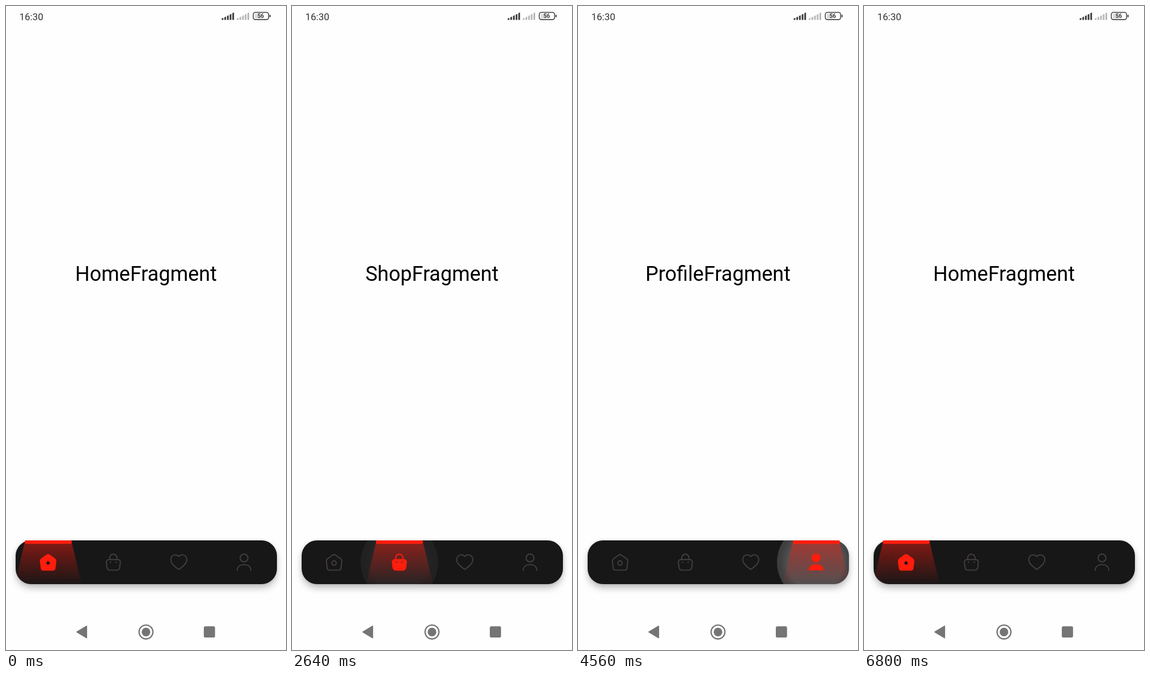
Write an HTML page that moves like this. It is 494x1134 px and loops after 6.96 s.

```html
<!DOCTYPE html>
<html lang="en">
<head>
<meta charset="utf-8">
<title>Bottom navigation with spotlight</title>
<style>
  :root { --red: #ff1d0d; --bar: #171717; --idle: #463f3f; --loop: 6960ms; }
  html, body { margin: 0; width: 100%; height: 100%; overflow: hidden; background: #fefefe; }
  body { position: relative; font-family: Roboto, "Noto Sans", sans-serif; }
  svg { position: absolute; left: 0; top: 0; }

  .title {
    position: absolute; left: 0; top: 451px; width: 494px; margin: 0;
    font-size: 36px; line-height: 42px; text-align: center; color: #000;
    visibility: hidden;
  }

  .bar, .clip { position: absolute; border-radius: 27px; }
  .bar {
    left: 16.5px; top: 940.5px; width: 461px; height: 77.5px; background: var(--bar);
    box-shadow: 0 7px 13px -1px rgba(0, 0, 0, .28), 0 0 4px rgba(0, 0, 0, .1);
  }
  .clip { inset: 0; overflow: hidden; }

  /* indicator and its beam share the same moving edges */
  .slide { position: absolute; top: 0; animation: edges var(--loop) infinite cubic-bezier(.364, 0, .636, 1); }
  .lamp { height: 6px; background: var(--red); border-radius: 2px 2px 3px 3px; }
  .beam { height: 100%; }
  .beam::before {
    content: ""; position: absolute; inset: 0 -17.5px;
    background: linear-gradient(rgba(255, 29, 18, .46) 5%, rgba(255, 29, 18, .03) 97%);
    clip-path: polygon(18.5px 0, calc(100% - 18.5px) 0, 100% 100%, 0 100%);
  }
  @keyframes edges {
    0%, 28.448%       { left: 16.5px; }
    28.736%           { left: 16.5px; }
    33.046%, 45.977%  { left: 131.75px; }
    50.287%, 61.207%  { left: 247px; }
    65.517%, 73.664%  { left: 362.25px; }
    77.974%, 100%     { left: 16.5px; }
    0%, 28.448%       { right: 361.5px; }
    32.759%, 45.69%   { right: 246.25px; }
    50%, 60.92%       { right: 131px; }
    65.23%, 73.951%   { right: 15.75px; }
    78.261%, 100%     { right: 361.5px; }
  }

  .ripple {
    position: absolute; top: -29.75px; left: calc(-10.9px + 115.25px * var(--i));
    width: 137px; height: 137px; border-radius: 50%; opacity: 0;
    background: radial-gradient(closest-side, rgba(255, 255, 255, .25) 72%, rgba(255, 255, 255, .19) 88%, rgba(255, 255, 255, .16));
    animation: ripple var(--loop) var(--press) infinite;
  }
  @keyframes ripple {
    0%        { opacity: 0; transform: scale(.35); animation-timing-function: ease-out; }
    1.1%      { opacity: 1; }
    3.7%      { transform: scale(1); }
    6.5%      { opacity: 1; animation-timing-function: linear; }
    11.9%     { opacity: 0; }
    100%      { opacity: 0; transform: scale(1); }
  }

  .icon { fill: transparent; stroke: var(--idle); stroke-width: 1.9; stroke-linecap: round; stroke-linejoin: round; }
  .icon > * { visibility: visible; }
  .icon .hole { fill: var(--bar); }
  .icon .eyes { fill: var(--idle); stroke: none; }
  .icon .line { fill: none; }

  /* each tab swaps its title and icon at once */
  .home    { animation: home var(--loop) step-end infinite; }
  .shop    { animation: shop var(--loop) step-end infinite; }
  .fav     { animation: fav var(--loop) step-end infinite; }
  .profile { animation: profile var(--loop) step-end infinite; }
  @keyframes home {
    0%, 73.664%, 100% { visibility: visible; fill: var(--red); stroke: var(--red); }
    28.448%           { visibility: hidden; fill: transparent; stroke: var(--idle); }
  }
  @keyframes shop {
    28.448%           { visibility: visible; fill: var(--red); stroke: var(--red); }
    0%, 45.69%, 100%  { visibility: hidden; fill: transparent; stroke: var(--idle); }
  }
  @keyframes fav {
    45.69%            { visibility: visible; fill: var(--red); stroke: var(--red); }
    0%, 60.92%, 100%  { visibility: hidden; fill: transparent; stroke: var(--idle); }
  }
  @keyframes profile {
    60.92%            { visibility: visible; fill: var(--red); stroke: var(--red); }
    0%, 73.664%, 100% { visibility: hidden; fill: transparent; stroke: var(--idle); }
  }
</style>
</head>
<body>
  <p class="title home">HomeFragment</p>
  <p class="title shop">ShopFragment</p>
  <p class="title fav">FavoriteFragment</p>
  <p class="title profile">ProfileFragment</p>

  <div class="bar">
    <div class="clip">
      <div class="ripple" style="--i:0; --press:4990ms"></div>
      <div class="ripple" style="--i:1; --press:1910ms"></div>
      <div class="ripple" style="--i:2; --press:3110ms"></div>
      <div class="ripple" style="--i:3; --press:4230ms"></div>
      <div class="slide beam"></div>
    </div>
    <div class="slide lamp"></div>
  </div>

  <svg width="494" height="1134" viewBox="0 0 494 1134">
    <!-- status bar -->
    <text x="23.5" y="24.7" font-size="17" fill="#333">16:30</text>
    <defs>
      <path id="signal" d="M0 24.5v-2.5l3-1.3v3.8zM4.7 24.5v-4.6l3-1.4v6zM9.4 24.5v-6.8l3-1.5v8.3zM14.1 24.5v-9.2l3-1.5v10.7zM18.8 24.5v-11.7l3-1.5v13.2z"/>
    </defs>
    <use href="#signal" x="380.5" fill="#3c3c3c"/>
    <use href="#signal" x="407.2" fill="#b8b8b8"/>
    <rect x="439" y="13.5" width="12" height="8.5" rx="1.5" fill="#dcdcdc"/>
    <rect x="436.3" y="11.3" width="27" height="12.6" rx="3.6" fill="none" stroke="#444" stroke-width="1.6"/>
    <rect x="464.8" y="15.2" width="2" height="4.8" rx="1" fill="#444"/>
    <text x="449.5" y="21.3" font-size="10" font-weight="700" text-anchor="middle" fill="#444">56</text>

    <!-- tabs -->
    <g class="icon home">
      <path d="M72 966.8Q74.3 965.2 76.6 966.8L86 973.6Q88.2 975.3 87.8 978L86.4 990Q86 993.4 82.6 993.4H66Q62.6 993.4 62.2 990L60.7 978Q60.4 975.3 62.6 973.6Z"/>
      <circle class="hole" cx="74.2" cy="980.8" r="3.8"/>
    </g>
    <g class="icon shop">
      <path d="M182.3 974.8H196.5Q202.3 974.8 201.7 980L200.6 988.6Q199.9 993.4 195 993.4H183.8Q178.9 993.4 178.2 988.6L177.1 980Q176.5 974.8 182.3 974.8Z"/>
      <path class="line" d="M182.9 974.3V971.8A6.5 6.5 0 0 1 195.9 971.8V974.3"/>
      <g class="eyes"><circle cx="184.4" cy="979.5" r="1.3"/><circle cx="194.4" cy="979.5" r="1.3"/></g>
    </g>
    <g class="icon fav">
      <path d="M304.8 969.4C301.5 965.4 296 965.6 293 968.7C289.6 972.3 290 978 293.2 982.2C296.4 986.3 300.4 989.4 304.8 992.2C309.2 989.4 313.2 986.3 316.4 982.2C319.6 978 320 972.3 316.6 968.7C313.6 965.6 308.1 965.4 304.8 969.4Z"/>
    </g>
    <g class="icon profile">
      <circle cx="420" cy="971.9" r="6.9"/>
      <path d="M407.8 993.7C408.2 987 413.2 983.6 420 983.6S431.8 987 432.2 993.7"/>
    </g>

    <!-- system buttons -->
    <g fill="#757575">
      <path d="M125 1102.3L142.2 1092V1112.6Z" stroke="#757575" stroke-width="1.8" stroke-linejoin="round"/>
      <circle cx="247" cy="1102.3" r="12.2" fill="none" stroke="#757575" stroke-width="2.3"/>
      <circle cx="247" cy="1102.3" r="7.6"/>
      <rect x="349" y="1092.3" width="19.8" height="19.8" rx="2.8"/>
    </g>
  </svg>
</body>
</html>
```
